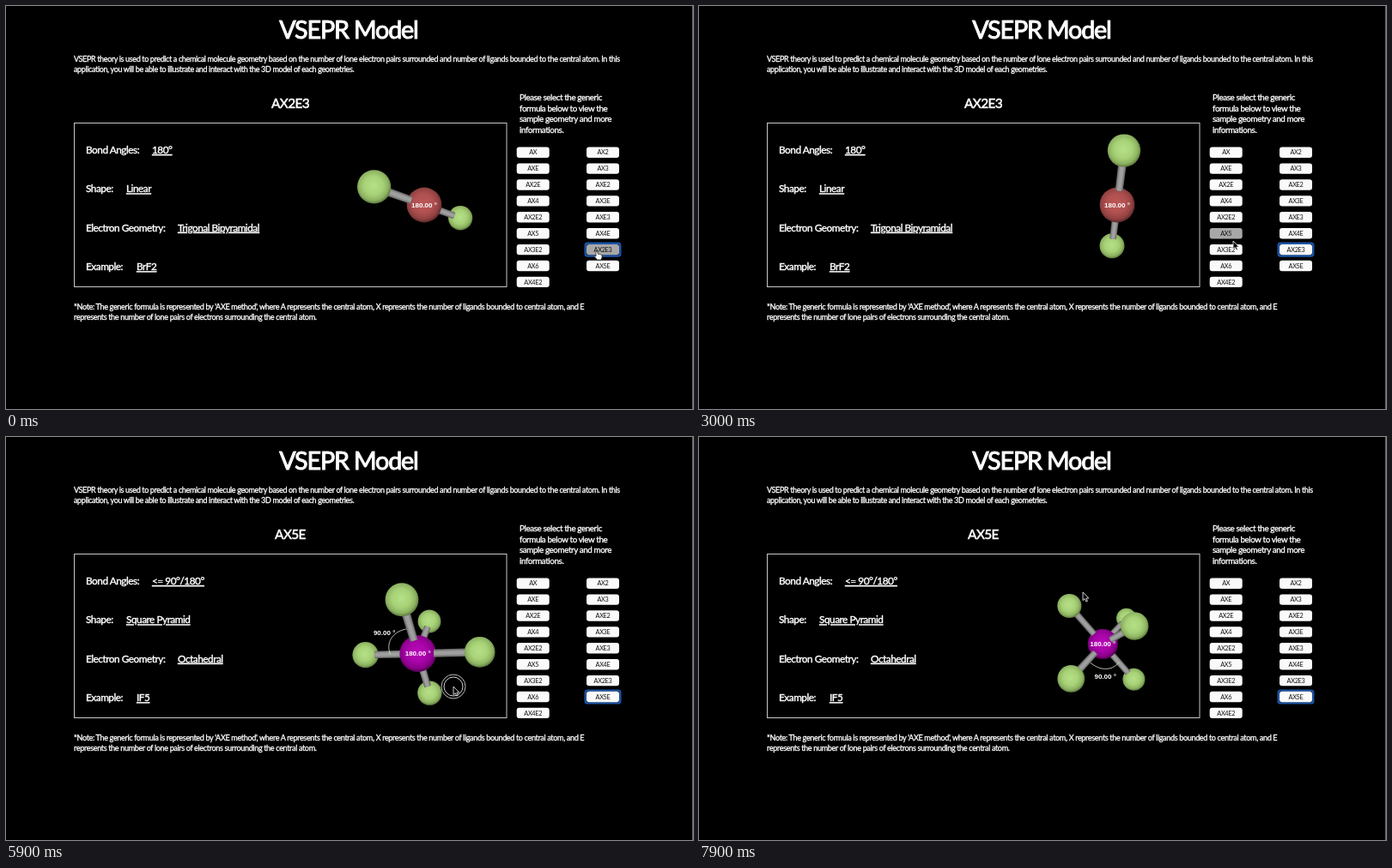
These frames come from a looping animation (800 px wide and 470 px high, 8000 ms). An HTML page:

```html
<!DOCTYPE html>
<html lang="en">
<head>
<meta charset="utf-8">
<title>VSEPR Model</title>
<style>
  html, body { margin: 0; width: 100%; height: 100%; overflow: hidden; background: #000; }
  svg { display: block; width: 800px; height: 470px; }
  text { font-family: Lato, "Open Sans", sans-serif; letter-spacing: -.04em; white-space: pre;
    fill: #fff; stroke: #fff; stroke-width: .035em; }
  .mid { text-anchor: middle; }
  .value { text-decoration: underline; }
  .angle { font: bold 8px "Liberation Sans", Arial, sans-serif; letter-spacing: 0; text-anchor: middle; stroke: none; }
  .key { fill: #111; stroke: none; }
</style>
</head>
<body>
<svg viewBox="0 0 800 470">
  <defs id="defs"></defs>
  <g id="page"></g>
  <g id="info"></g>
  <g id="model"></g>
  <g id="pointer"></g>
</svg>
<script>
const LOOP = 8000, STEP = 100, CLICK = 4200;
const $ = id => document.getElementById(id);
const label = (s, x, y, size, cls = '') =>
  `<text x="${x}" y="${y}" font-size="${size}" class="${cls}">${s}</text>`;
const lines = (list, x, y, gap, size) =>
  list.map((s, i) => label(s, x, y + i * gap, size)).join('');

// Static page
const gradient = (id, light, base, dim, edge) =>
  `<radialGradient id="${id}" cx=".48" cy=".46" r=".55"><stop stop-color="${light}"/>
   <stop offset=".5" stop-color="${base}"/><stop offset=".8" stop-color="${dim}"/>
   <stop offset="1" stop-color="${edge}"/></radialGradient>`;
$('defs').innerHTML =
  gradient('green', '#b6e088', '#a8d277', '#8db362', '#587439') +
  gradient('red', '#bd5858', '#b05050', '#934242', '#582727') +
  gradient('purple', '#b80cb8', '#a804a8', '#8c008c', '#500050');
$('page').innerHTML =
  label('VSEPR Model', 399, 38, 28.7, 'mid') +
  lines(['VSEPR theory is used to predict a chemical molecule geometry based on the number of lone electron pairs surrounded and number of ligands bounded to the central atom. In this',
    'application, you will be able to illustrate and interact with the 3D model of each geometries.'], 79, 64.5, 12, 9) +
  lines(['Please select the generic', 'formula below to view the', 'sample geometry and more', 'informations.'], 598, 110, 12.7, 9.8) +
  lines(["*Note: The generic formula is represented by 'AXE method', where A represents the central atom, X represents the number of ligands bounded to central atom, and E",
    'represents the number of lone pairs of electrons surrounding the central atom.'], 79, 353.5, 12.5, 9.1) +
  lines(['Bond Angles:', 'Shape:', 'Electron Geometry:', 'Example:'], 93, 172, 45.4, 11.8) +
  '<rect x="79.5" y="136.5" width="503.5" height="191" fill="none" stroke="#c8c8c8"/>' +
  '<rect x="799" width="1" height="470" fill="#666"/>';

// Info panel and buttons
const columns = [
  ['AX', 'AXE', 'AX2E', 'AX4', 'AX2E2', 'AX5', 'AX3E2', 'AX6', 'AX4E2'],
  ['AX2', 'AX3', 'AXE2', 'AX3E', 'AXE3', 'AX4E', 'AX2E3', 'AX5E']
];
const facts = {
  AX2E3: ['180°', 'Linear', 'Trigonal Bipyramidal', 'BrF2'],
  AX5E: ['&lt;= 90°/180°', 'Square Pyramid', 'Octahedral', 'IF5']
};
const valueX = [170, 140, 200, 152];

function button(name, x, y, hover, focus) {
  const ring = focus ? `<rect x="${x - 1.3}" y="${y - 7.4}" width="40.6" height="14.8" rx="2.5" fill="none" stroke="#1d54a6" stroke-width="2.4"/>` : '';
  return ring + `<rect x="${x}" y="${y - 6.2}" width="38" height="12.4" rx="3" fill="${hover ? '#a8a8a8' : '#fafafa'}"/>` +
    label(name, x + 19, y + 2.6, 7.3, 'mid key');
}

function info(name, hover) {
  return label(name, 331, 119, 15.4, 'mid') +
    facts[name].map((s, i) => label(s, valueX[i], 172 + i * 45.4, 11.8, 'value')).join('') +
    columns.map((col, c) => col.map((s, i) =>
      button(s, c ? 676 : 594.7, 170.7 + i * 18.9, s === hover, s === name)).join('')).join('');
}

// Keyframe tracks: [time, ...values]
function at(track, t) {
  const i = track.findIndex(k => k[0] > t);
  if (i < 0) return track[track.length - 1].slice(1);
  if (!i) return track[0].slice(1);
  const a = track[i - 1], b = track[i], f = (t - a[0]) / (b[0] - a[0]);
  return a.slice(1).map((v, j) => v + (b[j + 1] - v) * f);
}
const cursorTrack = [
  [0, 687, 286], [300, 687, 286], [1200, 409, 235], [1600, 409, 235], [2000, 419, 230],
  [2500, 452, 212], [2600, 452, 212], [3000, 622, 274], [3700, 689, 305], [4700, 689, 305],
  [5200, 490, 275], [5500, 490, 275], [5900, 521, 291], [6700, 481, 238], [7800, 447, 181]
];
const axisTrack = [
  [1600, -48.7, -17.6, 35.4], [2000, -37.3, -22.2, 45.3], [2500, 6.9, -54.9, 31]
];
// apex direction, then one ligand of the square base
const pyramidTrack = [
  [5500, .74, -.26, -.62, -.57, .305, -.763],
  [5900, .21, -.59, -.78, -.955, .05, -.29],
  [6700, .9, .29, -.33, -.405, .84, -.365],
  [7800, .58, -.33, .745, -.5, .57, .65]
];

// Vectors: x right, y down, z towards the viewer
const BOND = 63;
const kinds = {
  linear: { depth: 220, core: 20.4, ligand: 16.5, color: 'red' },
  pyramid: { depth: 250, core: 19.2, ligand: 14.8, color: 'purple' }
};
let kind = kinds.linear;
const dot = (a, b) => a[0] * b[0] + a[1] * b[1] + a[2] * b[2];
const add = (a, b, k = 1) => a.map((v, i) => v + b[i] * k);
const scale = (a, k) => a.map(v => v * k);
const unit = a => scale(a, 1 / Math.hypot(...a));
const cross = (a, b) => [a[1] * b[2] - a[2] * b[1], a[2] * b[0] - a[0] * b[2], a[0] * b[1] - a[1] * b[0]];
function project(v) {
  const s = kind.depth / (kind.depth - v[2]);
  return { x: 487 + v[0] * s, y: 232 + v[1] * s, s };
}
const points = list => list.map(p => p.x.toFixed(2) + ',' + p.y.toFixed(2)).join(' ');

function atom(v, r, color) {
  const p = project(v);
  return { z: v[2], svg: `<circle cx="${p.x}" cy="${p.y}" r="${r * p.s}" fill="url(#${color})"/>` };
}

function bond(center, dir) {
  const from = add(center, dir, kind.core - 2), to = add(center, dir, BOND - 12);
  const a = project(from), b = project(to);
  const len = Math.hypot(b.x - a.x, b.y - a.y) || 1;
  const nx = (a.y - b.y) / len, ny = (b.x - a.x) / len;
  const off = (p, w) => ({ x: p.x + nx * w * p.s, y: p.y + ny * w * p.s });
  const strip = (k, color) => {
    const w = kind.core * k;
    return `<polygon points="${points([off(a, w), off(b, w), off(b, -w), off(a, -w)])}" fill="${color}"/>`;
  };
  return { z: (from[2] + to[2]) / 2, svg: strip(.21, '#646464') + strip(.165, '#868686') + strip(.1, '#9f9f9f') };
}

function angleText(s, v) {
  const p = project(v);
  return `<text class="angle" x="${p.x}" y="${p.y + 2.8}">${s} °</text>`;
}

function rightAngle(center, p, q) {
  const spot = add(center, add(p, q), 29);
  const arc = Array.from({ length: 19 }, (_, i) => {
    const a = i / 18 * Math.PI / 2;
    return project(add(center, add(scale(p, Math.cos(a)), q, Math.sin(a)), 32));
  });
  return {
    z: spot[2],
    svg: `<polyline points="${points(arc)}" fill="none" stroke="#dde8d5" stroke-width=".8"/>` + angleText('90.00', spot)
  };
}

function model(center, dirs, extra = []) {
  const parts = [atom(center, kind.core, kind.color), ...extra];
  for (const d of dirs) parts.push(bond(center, d), atom(add(center, d, BOND), kind.ligand, 'green'));
  return parts.sort((a, b) => a.z - b.z).map(p => p.svg).join('') + angleText('180.00', center);
}

function linear(t) {
  kind = kinds.linear;
  const d = unit(at(axisTrack, t));
  return model([0, 0, 0], [d, scale(d, -1)]);
}

function pyramid(t) {
  kind = kinds.pyramid;
  const pose = at(pyramidTrack, t);
  const u = unit(pose.slice(0, 3)), raw = pose.slice(3);
  const p = unit(add(raw, u, -dot(raw, u))), q = cross(p, u);
  const center = scale(u, -BOND / 2);
  return model(center, [u, p, q, scale(p, -1), scale(q, -1)], [rightAngle(center, p, q)]);
}

// Pointer
const arrow = '<path d="M0 0V9.6L2.2 7.6L3.8 11L5.4 10.3L3.9 7H6.8Z" fill="#000" stroke="#fff" stroke-width=".8"/>';
const hand = '<path d="M0 .6Q.9-.5 1.7.6L2.4 3.6Q3.4 3 4 3.7Q5 3.2 5.5 4Q6.7 3.6 7 4.8V7.2L6 10H1.6L-1.8 6.2Q-1.6 5 0 6Z" fill="#fff" stroke="#222" stroke-width=".7"/>';
const ring = '<g fill="none"><circle r="12.6" stroke="#000" stroke-width="4"/><circle r="14" stroke="#e8e8e8" stroke-width=".8"/><circle r="11" stroke="#e8e8e8" stroke-width=".9"/></g>';

function pointer(t, overButton) {
  const [x, y] = at(cursorTrack, t);
  const drag = t >= 1600 && t < 2500 || t >= 5500 && t < 7800;
  return `<g transform="translate(${x} ${y})">${drag ? ring : ''}${overButton ? hand : arrow}</g>`;
}

function hovered(t) {
  if (t < 400) return 'AX2E3';
  if (t >= 3000 && t < 3100) return 'AX5';
  if (t >= 3700 && t < 4800) return 'AX5E';
}

let shown = -1;
function draw(now) {
  const t = Math.floor(now % LOOP / STEP) * STEP;
  if (t !== shown) {
    shown = t;
    const hover = hovered(t);
    $('info').innerHTML = info(t < CLICK ? 'AX2E3' : 'AX5E', hover);
    $('model').innerHTML = t < CLICK ? linear(t) : pyramid(t);
    $('pointer').innerHTML = pointer(t, hover && hover !== 'AX5');
  }
  requestAnimationFrame(draw);
}
draw(0);
</script>
</body>
</html>
```
